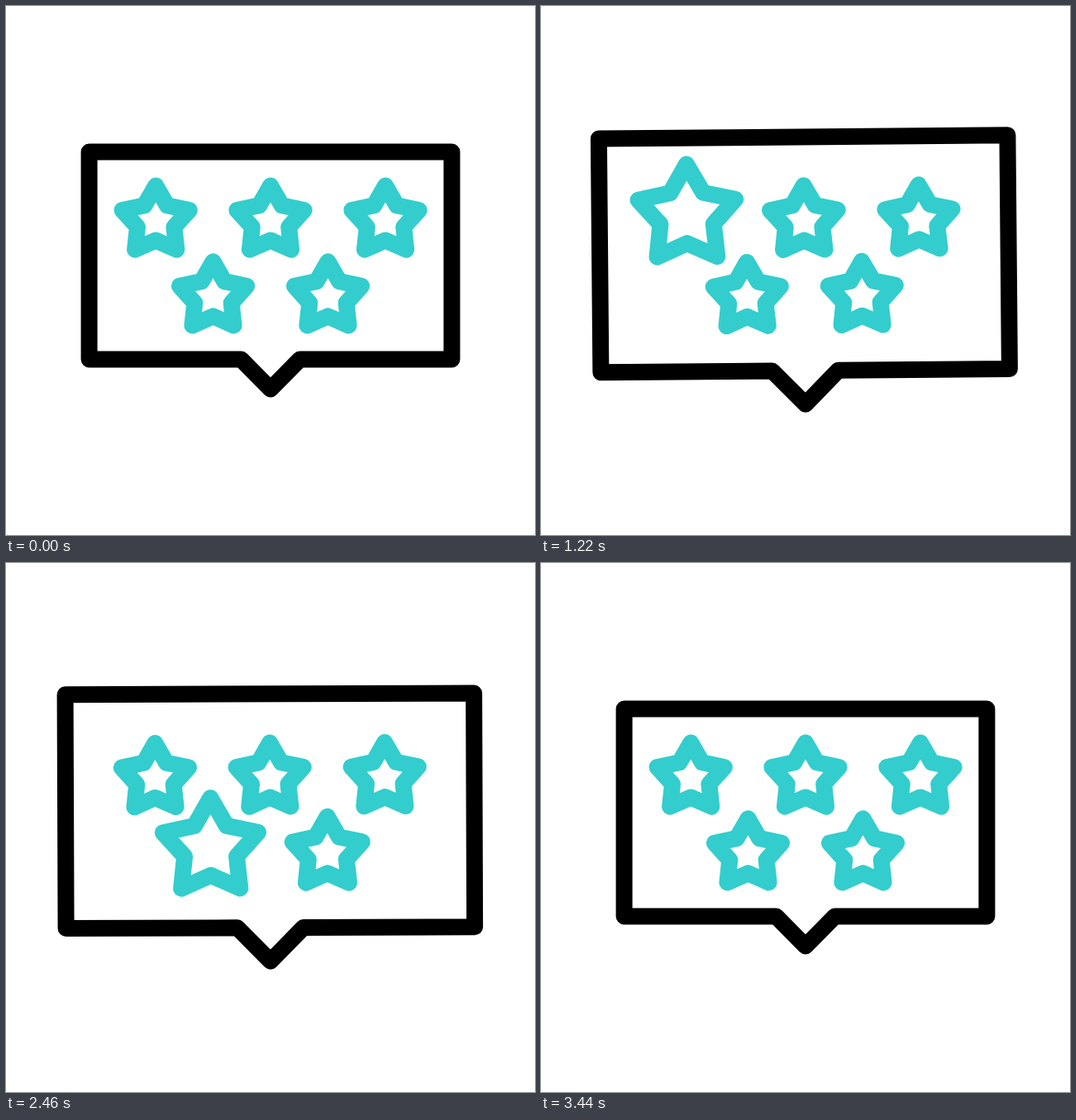
Write an HTML page that moves like this. It is 640 by 640 pixels and loops after 3600 ms.

```html
<!DOCTYPE html>
<html lang="en">
<head>
<meta charset="utf-8">
<title>Five-star review</title>
<style>
  html, body { margin: 0; width: 100%; height: 100%; overflow: hidden; background: #fff; }
  svg { display: block; width: 100%; height: 100%; }

  path {
    fill: none;
    stroke-width: 20;
    stroke-linejoin: round;
    vector-effect: non-scaling-stroke;
  }

  /* The whole card rocks on the tip of the bubble, then hops back */
  .card {
    transform-origin: 320px 482px;
    animation: swing 3.6s cubic-bezier(.167, 0, .833, 1) infinite,
               hop 3.6s cubic-bezier(.167, 0, .833, 1) infinite;
  }
  .bubble {
    stroke: #000;
    transform-origin: 320px 320px;
    animation: grow 3.6s cubic-bezier(.167, 0, .833, 1) infinite;
  }
  .stars { stroke: #33cdcd; }
  .stars use {
    transform-origin: 6px 18px;
    animation: pulse 3.6s cubic-bezier(.25, 0, .75, 1) var(--d) infinite;
  }

  @keyframes swing {
    0%, 2.778% { rotate: 0deg; }
    16.667%, 38.889%, 61.111% { rotate: -4deg; }
    27.778%, 50% { rotate: 4deg; }
    16.667%, 27.778%, 38.889%, 50%, 61.111% { animation-timing-function: cubic-bezier(.167, 0, .833, 1); }
    77.778% { rotate: 5deg; animation-timing-function: cubic-bezier(.167, .167, .833, 1); }
    94.444%, 100% { rotate: 0deg; }
  }
  @keyframes hop {
    0%, 77.778% { translate: 0 0; }
    86.111% { translate: 0 -31px; animation-timing-function: cubic-bezier(.167, .167, .833, 1); }
    94.444%, 100% { translate: 0 0; }
  }
  @keyframes grow {
    0%, 1.667% { scale: 1; }
    11.111% { scale: 1.127; }
    77.778% { scale: 1.127; animation-timing-function: cubic-bezier(.167, .167, .833, 1); }
    94.444%, 100% { scale: 1; }
  }
  @keyframes pulse {
    0%, 22.222%, 100% { scale: 1; }
    11.111% { scale: 1.455; }
  }
</style>
</head>
<body>
<svg viewBox="0 0 640 640">
  <defs>
    <path id="star" d="M0-42.7 13.7-18.9 40.6-13.2 22.2 7.2 25.1 34.5 0 23.3-25.1 34.5-22.2 7.2-40.6-13.2-13.7-18.9Z"/>
  </defs>
  <g class="card">
    <path class="bubble" d="M100.6 176.6H539.4V427.5H355.5L320 463.5 284.5 427.5H100.6Z"/>
    <g class="stars">
      <g transform="translate(181.2 260.2)"><use href="#star" style="--d: .8s"/></g>
      <g transform="translate(320 260.2)"><use href="#star" style="--d: 1.2s"/></g>
      <g transform="translate(459 260.2)"><use href="#star" style="--d: 1.6s"/></g>
      <g transform="translate(250.5 352)"><use href="#star" style="--d: 2s"/></g>
      <g transform="translate(389.5 352)"><use href="#star" style="--d: 2.4s"/></g>
    </g>
  </g>
</svg>
</body>
</html>
```
